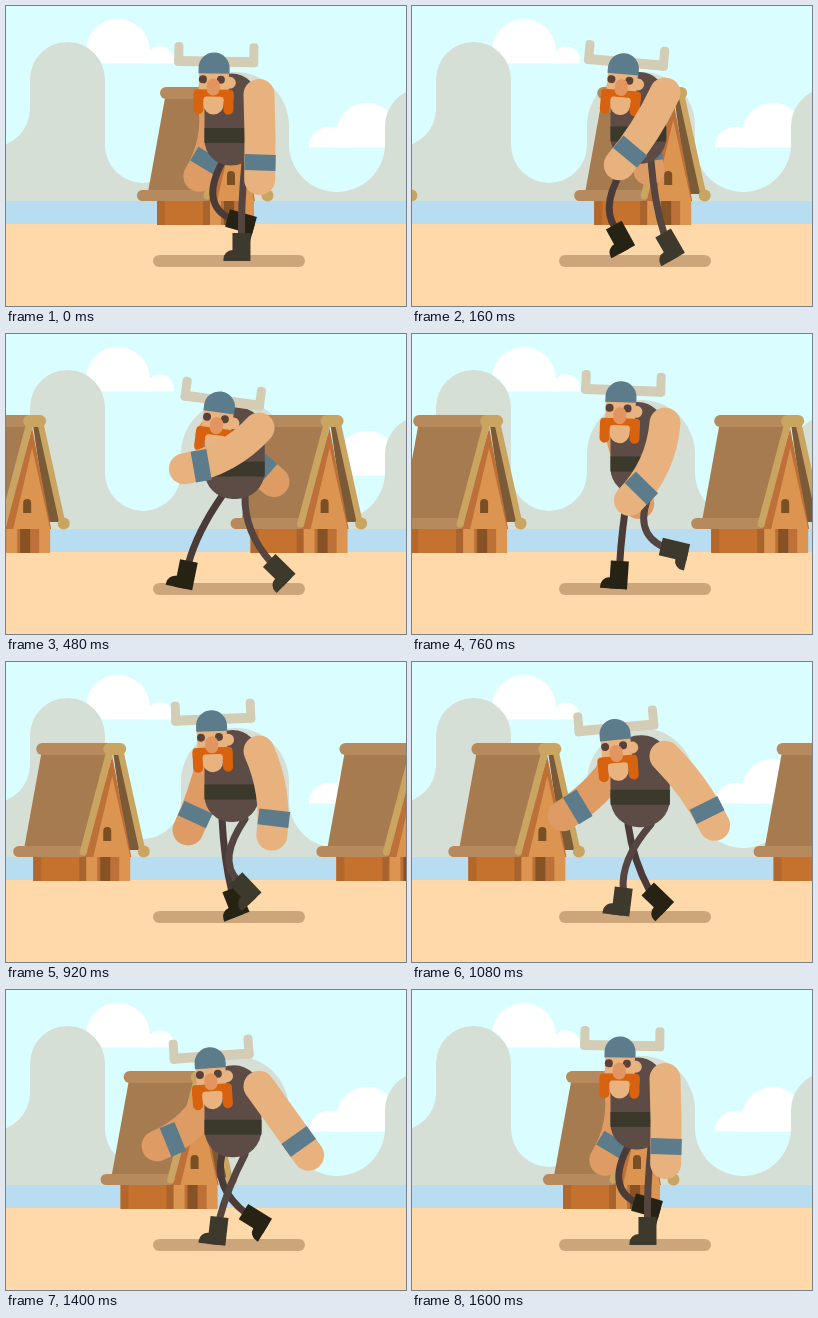
Animation, 400 px wide and 300 px high, one loop 1640 ms. Source, as an HTML page with a canvas:

```html
<!DOCTYPE html>
<html lang="en">
<head>
<meta charset="utf-8">
<title>Walking viking</title>
<style>
html, body { margin: 0; width: 100%; height: 100%; overflow: hidden; }
canvas { display: block; }
</style>
</head>
<body>
<canvas id="stage" width="400" height="300"></canvas>
<script>
const ctx = document.getElementById('stage').getContext('2d');
const LOOP = 1640, CYCLE = 1600, STEP = 40;
const { PI, sin, cos, atan2, max } = Math;
const rad = deg => deg * PI / 180;

function box(color, x, y, w, h, r = 0) {
  ctx.fillStyle = color;
  ctx.beginPath();
  ctx.roundRect(x, y, w, h, r);
  ctx.fill();
}

function disc(color, x, y, r) {
  box(color, x - r, y - r, 2 * r, 2 * r, r);
}

function poly(color, ...pts) {
  ctx.fillStyle = color;
  ctx.beginPath();
  for (let i = 0; i < pts.length; i += 2) ctx.lineTo(pts[i], pts[i + 1]);
  ctx.fill();
}

function stroke(color, width, x, y, ...rest) {
  ctx.strokeStyle = color;
  ctx.lineWidth = width;
  ctx.lineCap = 'round';
  ctx.beginPath();
  ctx.moveTo(x, y);
  if (rest.length === 4) ctx.quadraticCurveTo(...rest);
  else ctx.lineTo(...rest);
  ctx.stroke();
}

function at(x, y, angle, draw) {
  ctx.save();
  ctx.translate(x, y);
  ctx.rotate(angle);
  draw();
  ctx.restore();
}

function landscape() {
  box('#dafdff', 0, 0, 400, 300);
  ctx.save();
  ctx.beginPath();
  ctx.rect(0, 0, 400, 57.5);
  ctx.rect(300, 57.5, 100, 84);
  ctx.clip();
  disc('#fff', 112, 45, 32);
  disc('#fff', 154, 54.5, 14);
  disc('#fff', 361, 128, 31);
  disc('#fff', 323, 141, 20);
  box('#fff', 323, 121, 64, 21);
  ctx.restore();

  // valleys and hills alternate as touching half circles
  ctx.fillStyle = '#d6dfd5';
  ctx.beginPath();
  ctx.moveTo(-52, 195);
  const curves = [[-14, 103, 38], [61.5, 73.5, 37.5], [137, 139, 38],
    [229, 120, 54], [331, 138, 48], [417, 120, 38]];
  curves.forEach(([x, y, r], i) => ctx.arc(x, y, r, PI, 0, i % 2 === 0));
  ctx.lineTo(455, 195);
  ctx.fill();

  box('#b8ddf0', 0, 195, 400, 23);
  box('#ffd9a9', 0, 218, 400, 82);
}

function hut() {
  const gold = '#c9a561', beam = '#b68a5c', light = '#db9550', mid = '#bd7038';
  // walls
  box('#c5722e', 20, 194, 52, 25);
  box('#b4672a', 20, 194, 8, 25);
  box('#a9632c', 66, 194, 8, 25);
  box(light, 73, 194, 44, 25);
  box(mid, 84, 194, 22, 25);
  box('#875224', 87, 195, 10, 24);
  // gable
  poly('#7a5a37', 100, 92, 107, 92, 129, 188, 114, 188);
  poly(mid, 99, 94, 70, 195, 118, 195);
  poly(light, 99, 114, 80, 195, 117, 195);
  box('#7a4f24', 90, 165, 8, 14, [4, 4, 0, 0]);
  // roof
  poly('#a67b50', 28, 92, 97, 92, 68, 186, 11, 186);
  box(beam, 23, 81, 80, 12, 6);
  box(beam, 0, 184, 74, 11, 5.5);
  stroke(gold, 7, 97, 88, 70, 190);
  stroke(gold, 6, 107, 88, 129, 188);
  box(gold, 90, 81, 23, 12, 6);
  disc(gold, 130.5, 189.5, 6);
}

// `p` is the walk phase of the limb; the two sides are half a turn apart.
function leg(p, hipX, hipY, color, bootColor) {
  const x = hipX - 2 + 29 * sin(p - rad(9)) + 3 * cos(2 * p);
  const y = 227 - 15 * max(0, -cos(p)) ** 3;
  const tilt = rad(-26 + 26 * cos(p) - 31 * sin(p) - 11 * cos(2 * p) + 11 * cos(3 * p));
  const kneeX = hipX - 13 + 18 * cos(p - rad(60));
  stroke(color, 7, hipX, hipY, kneeX, 198, x - 3 * sin(tilt), y + 3 * cos(tilt));
  at(x, y, tilt, () => {
    box(bootColor, -9, 0, 18, 28);
    box(bootColor, -18, 17, 20, 11, [9, 0, 0, 0]);
  });
}

function arm(p, x, y, reach, lean, skin) {
  const swing = rad(lean - 54 * sin(p - rad(9)));
  const bow = 8 + 8 * cos(p - rad(145));
  const dx = sin(swing), dy = cos(swing);
  const handX = x + reach * dx, handY = y + reach * dy;
  const elbowX = x + reach / 2 * dx + bow * dy;
  const elbowY = y + reach / 2 * dy - bow * dx;
  stroke(skin, 31, x, y, elbowX, elbowY, handX, handY);
  at(handX, handY, atan2(handY - elbowY, handX - elbowX),
    () => box('#5c7b8b', -25, -15.5, 16, 31));
}

function head() {
  const skin = '#e9b380', hair = '#d9620f', horn = '#d3cdb6';
  box(horn, -40, -17, 84, 10, 4);
  box(horn, -40, -31, 9, 24, 4);
  box(horn, 35, -31, 9, 24, 4);
  disc(skin, 16, 9, 6);
  box(skin, -15, -2, 30, 30);
  box('#5c7b8b', -15.5, -21, 31, 21, [15.5, 15.5, 0, 0]);
  disc('#5b4038', -11, 6, 4);
  disc('#5b4038', 7, 6, 4);
  box(hair, -20, 16, 40, 10, [4, 4, 0, 0]);
  box(hair, -20, 20, 10, 21, [0, 0, 5, 5]);
  box(hair, 10, 20, 10, 21, [0, 0, 5, 5]);
  box(skin, -10, 23, 20, 18, [3, 3, 10, 10]);
  box('#e3955f', -7, 5, 13, 17, 6.5);
}

function viking(p) {
  const top = 71 - 2.5 * sin(p) - 4.3 * cos(2 * p - rad(36));
  const width = 57 - 4 * cos(2 * p);
  const headY = top + 3 - 3 * cos(2 * p);
  arm(p + PI, 207, top + 26, 78, -2, '#de9c64');
  leg(p + PI, 216, top + 89, '#4a3b39', '#272314');
  leg(p, 239, top + 89, '#554541', '#3d392c');
  box('#5d4b46', 198.5, top, width, 92, [30, 28, 28, 28]);
  box('#3b382c', 198.5, top + 54.5, width, 15);
  at(208 + 5 * sin(p), headY, rad(1 + 7 * sin(p)), head);
  arm(p, 253, top + 21, 85, -8, '#e8b27f');
}

function frame(now) {
  const t = Math.floor(now % LOOP / STEP) * STEP % CYCLE;
  landscape();
  // one hut leaves while the next one arrives a little slower
  at(131 + 0.195 * t, 0, 0, hut);
  at(131 - 0.182 * (CYCLE - t), 0, 0, hut);
  box('#cda57a', 147, 249, 152, 12, 6);
  viking(2 * PI * t / CYCLE);
  requestAnimationFrame(frame);
}
requestAnimationFrame(frame);
</script>
</body>
</html>
```
